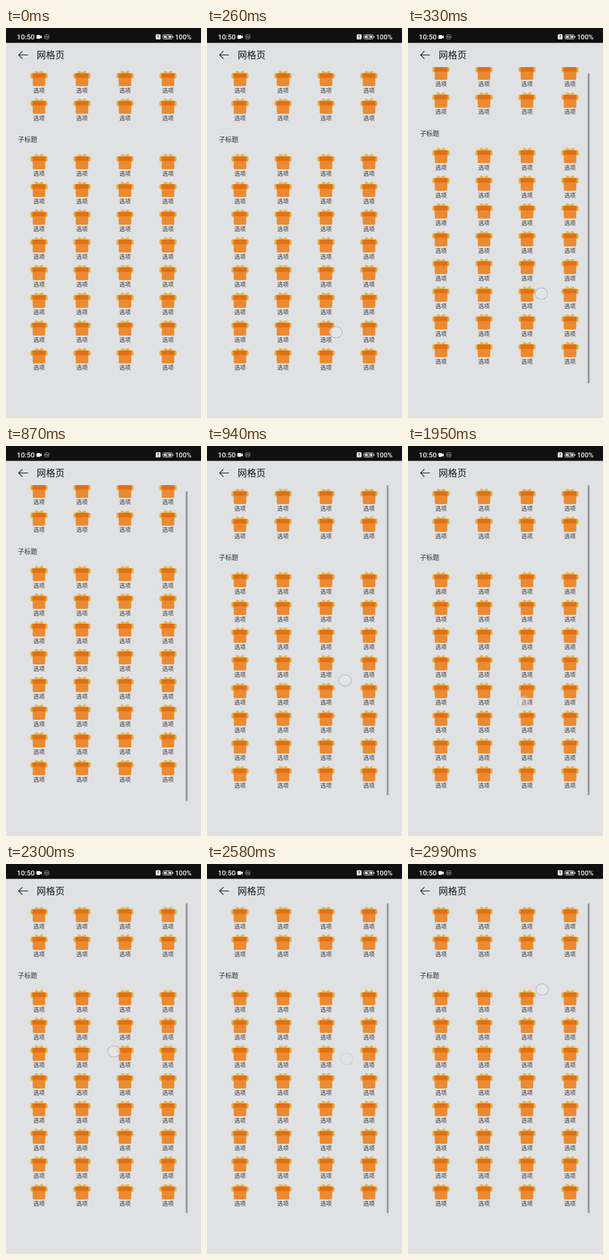
Write an HTML page that moves like this. It is 360 px wide and 718 px high and loops after 3.06 s.

```html
<!DOCTYPE html>
<html lang="zh-CN">
<head>
<meta charset="utf-8">
<title>网格页</title>
<style>
  html, body { margin: 0; width: 100%; height: 100%; overflow: hidden; background: #dfe1e3; }
  svg { display: block; width: 360px; height: 718px; }
  text { font-family: "Noto Sans CJK SC", "Noto Sans CJK", sans-serif; fill: #2b2c30; }
  .status text { font-family: Roboto, Inter, sans-serif; font-weight: 500; fill: #f2f2f2; }
  .label { font-size: 10.5px; text-anchor: middle; }
</style>
</head>
<body>
<svg viewBox="0 0 360 718">
  <defs>
    <clipPath id="view"><rect y="72" width="360" height="646"/></clipPath>
    <!-- Gift, centred on x = 0 with its top at y = 0 -->
    <g id="gift">
      <g fill="#e7b548">
        <rect x="-16" y="4" width="32" height="10.6" rx="4"/>
        <ellipse cx="-4" cy="3" rx="4" ry="2.4" transform="rotate(28 -4 3)"/>
        <ellipse cx="4" cy="3" rx="4" ry="2.4" transform="rotate(-28 4 3)"/>
      </g>
      <rect x="-13.3" y="5.2" width="26.6" height="7.6" rx="1.5" fill="#e29a30"/>
      <rect x="-11.5" y="8" width="23" height="20.2" rx="2.2" fill="#eb8a31"/>
      <rect x="-11.7" y="4.6" width="23.4" height="8.2" rx=".8" fill="#df7017"/>
    </g>
  </defs>

  <rect width="360" height="718" fill="#dfe1e3"/>
  <g clip-path="url(#view)">
    <g id="list">
      <text x="21.7" y="210.4" font-size="12">子标题</text>
    </g>
  </g>
  <rect id="bar" x="331.8" width="3.4" height="571" rx="1.7" fill="#93969c"/>

  <path d="M40 49.6H23.4M30 43L23.2 49.6L30 56.2" fill="none" stroke="#17181a" stroke-width="1.3" stroke-linecap="round" stroke-linejoin="round"/>
  <text x="56.6" y="55.6" font-size="17.2" font-weight="500" style="fill:#151618">网格页</text>

  <g class="status">
    <rect width="360" height="27.4" fill="#101010"/>
    <text x="20" y="20.6" font-size="13">10:50</text>
    <rect x="56.2" y="13" width="7" height="7" rx="1.4" fill="#f2f2f2"/>
    <path d="M62.5 15.5l3.5-2v6l-3.5-2z" fill="#f2f2f2"/>
    <g fill="none" stroke="#9b9b9b">
      <rect x="71.3" y="12.5" width="8" height="7.6" rx="1.8"/>
      <path d="M73.4 18.4v-4l3.8 4v-4M72 16.4h6.6" stroke-width=".8"/>
    </g>
    <rect x="276.5" y="11.4" width="8.8" height="9.6" rx="1.6" fill="#f2f2f2"/>
    <path d="M280.9 13v4M280.9 18.2v1.3" stroke="#101010" stroke-width="1.3"/>
    <rect x="289.8" y="12.4" width="17" height="8" rx="2" fill="none" stroke="#e6e6e6"/>
    <rect x="291.4" y="14" width="13.8" height="4.8" rx=".8" fill="#d8d8d8"/>
    <path d="M308.4 14.8v3.2" stroke="#e6e6e6" stroke-width="1.2"/>
    <path d="M294.6 16.7l4.4-2.4v1.6h3.2l-4.4 2.6v-1.8z" fill="#101010"/>
    <text x="312" y="20.6" font-size="12.5">100%</text>
  </g>

  <ellipse id="touch" rx="11.5" ry="10.3" fill="#e5e6ea" fill-opacity=".75" stroke="#b7bac3" stroke-width="1.3"/>
</svg>
<script>
  const LOOP = 3060;
  const SHIFT = 11.3;
  const $ = id => document.getElementById(id);
  const list = $("list"), bar = $("bar"), touch = $("touch");

  function add(name, attrs, text) {
    const el = document.createElementNS("http://www.w3.org/2000/svg", name);
    for (const key in attrs) el.setAttribute(key, attrs[key]);
    if (text) el.textContent = text;
    list.append(el);
  }

  // Row 2 is taken by the subtitle.
  for (let row = 0; row < 11; row++) {
    if (row === 2) continue;
    for (let col = 0; col < 4; col++) {
      const x = 60.9 + 79.4 * col, y = 78.7 + 51.05 * row;
      add("use", { href: "#gift", x, y });
      add("text", { class: "label", x, y: y + 40 }, "选项");
    }
  }

  // Finger positions: time, x, y
  const moves = [
    [260, 238, 560], [330, 246, 489], [400, 270, 335], [730, 281, 273],
    [940, 255, 431.5],
    [1480, 223, 316], [1550, 219.7, 369.3], [1880, 214, 470],
    [2160, 196, 501], [2230, 197, 430], [2300, 199, 345],
    [2440, 238, 490], [2510, 248, 425], [2580, 258.5, 359],
    [2920, 250, 195], [2990, 247.6, 231]
  ];

  // Lifting the finger: time, opacity until the next touch
  const fades = [
    [0, 0], [800, .5], [870, .12], [1270, .4], [1340, 0],
    [1950, .4], [2020, 0], [2370, .4], [2580, .4], [2720, 0]
  ];

  function draw(time) {
    const latest = table => table.findLast(step => step[0] <= time);
    const [moved, x, y] = latest(moves) || [-1, 0, 0];
    const [faded, alpha] = latest(fades);
    const shift = time >= 330 && time < 940 ? SHIFT : 0;
    list.setAttribute("transform", `translate(0 ${-shift})`);
    bar.setAttribute("y", 72 + shift);
    bar.setAttribute("opacity", time >= 330 ? 1 : 0);
    touch.setAttribute("cx", x);
    touch.setAttribute("cy", y);
    touch.setAttribute("opacity", faded >= moved ? alpha : 1);
  }

  const start = performance.now();
  function tick() {
    draw((performance.now() - start) % LOOP);
    requestAnimationFrame(tick);
  }
  tick();
</script>
</body>
</html>
```
